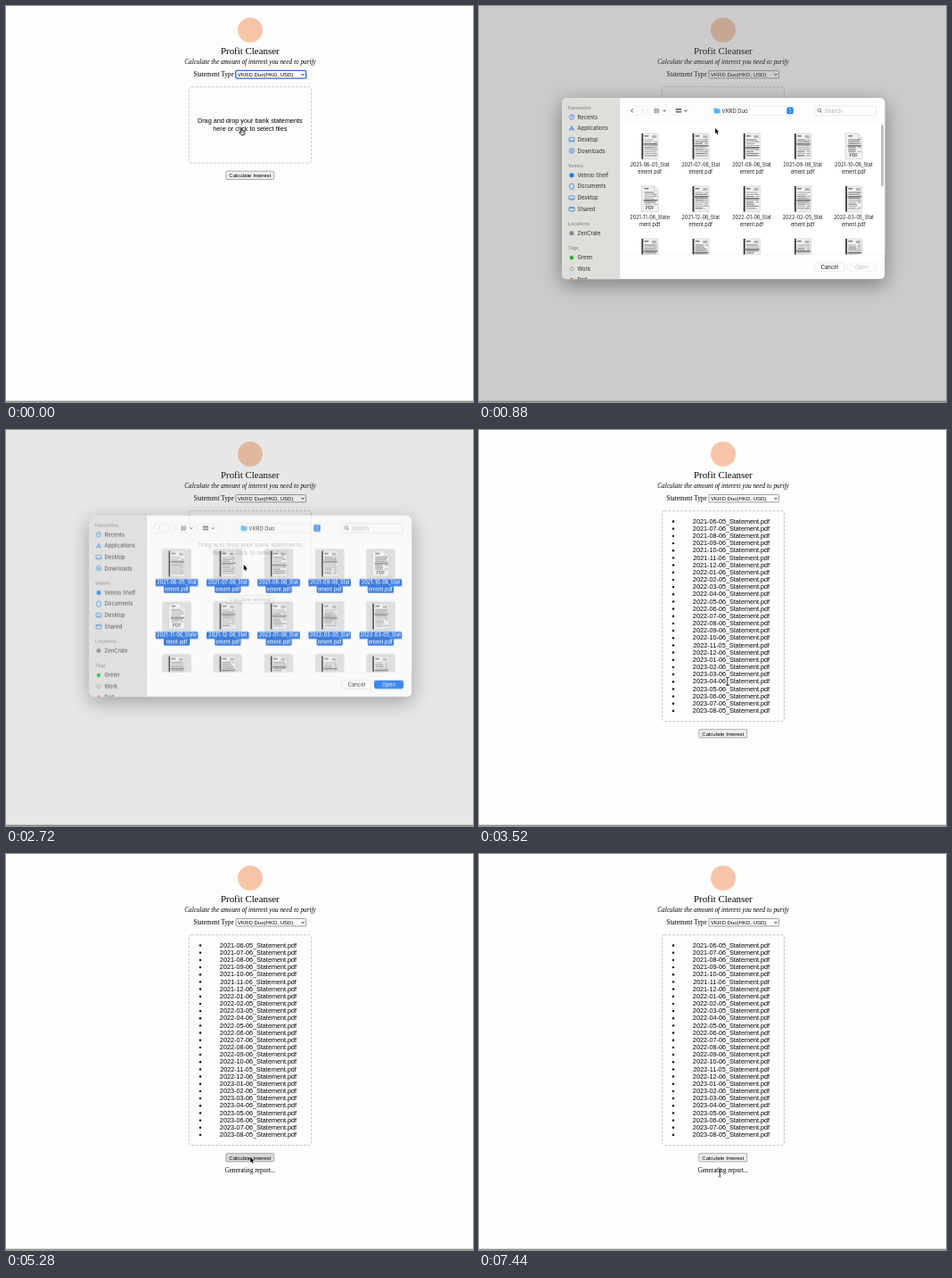
An HTML page with a canvas for the animation above (8 s loop, 524 by 444 pixels).

```html
<!DOCTYPE html>
<html lang="en">
<head>
<meta charset="utf-8">
<title>Profit Cleanser</title>
<style>
html, body { margin: 0; width: 100%; height: 100%; overflow: hidden; background: #fdfdfd; }
canvas { display: block; width: 524px; height: 444px; }
</style>
</head>
<body>
<canvas id="stage"></canvas>
<script>
const W = 524, H = 444, LOOP = 8000, STEP = 80;
const SERIF = '"Liberation Serif", serif';
const SANS = '"Liberation Sans", sans-serif';
const UI = 'Inter, "Open Sans", sans-serif';
const BLUE = '#1f7ae0', PICK = '#0b5cdb';
const PANEL = [93, 103.3, 362.4, 203, 5];
const dpr = window.devicePixelRatio || 1;

function setup(canvas) {
  canvas.width = W * dpr;
  canvas.height = H * dpr;
  const c = canvas.getContext('2d');
  c.scale(dpr, dpr);
  return c;
}
const main = setup(document.getElementById('stage'));
const sheet = document.createElement('canvas');
const sheetCtx = setup(sheet);
let g = main;

const clamp = v => Math.max(0, Math.min(1, v));
const ease = v => v * v * (3 - 2 * v);

function text(str, x, y, size, color, font, align = 'left', style = '') {
  g.font = `${style} ${size}px ${font}`;
  g.textAlign = align;
  g.fillStyle = color;
  g.fillText(str, x, y);
}
function rect(x, y, w, h, fill) {
  g.fillStyle = fill;
  g.fillRect(x, y, w, h);
}
function box(x, y, w, h, r, fill, stroke, lw = 0.5) {
  g.beginPath();
  g.roundRect(x, y, w, h, r);
  paint(fill, stroke, lw);
}
function circle(x, y, r, fill, stroke, lw) {
  g.beginPath();
  g.arc(x, y, r, 0, Math.PI * 2);
  paint(fill, stroke, lw);
}
function paint(fill, stroke, lw = 0.7) {
  if (fill) { g.fillStyle = fill; g.fill(); }
  if (stroke) { g.strokeStyle = stroke; g.lineWidth = lw; g.stroke(); }
}
function line(pts, color, lw = 0.7) {
  g.beginPath();
  for (let i = 0; i < pts.length; i += 2) g.lineTo(pts[i], pts[i + 1]);
  paint(null, color, lw);
}
function chevron(x, y, dx, dy, color, lw = 0.8) {
  line(dx ? [x - dx, y - 2, x + dx, y, x - dx, y + 2]
          : [x - 1.5, y - dy, x, y + dy, x + 1.5, y - dy], color, lw);
}

// Monthly statements, June 2021 to August 2023
const earlyMonths = [0, 8, 9, 17, 26];
const files = Array.from({ length: 27 }, (_, i) => {
  const m = i + 5;
  const month = String(m % 12 + 1).padStart(2, '0');
  return `${2021 + Math.floor(m / 12)}-${month}-0${earlyMonths.includes(i) ? 5 : 6}_Statement.pdf`;
});

function drawPage(s) {
  rect(0, 0, W, H, '#fdfdfd');
  circle(274, 27, 14, '#f6c5a8');
  text('Profit Cleanser', 273.8, 54.4, 10.9, '#000', SERIF, 'center');
  text('Calculate the amount of interest you need to purify', 274, 65.4, 7.26, '#000', SERIF, 'center', 'italic');
  text('Statement Type', 210.5, 79, 7.26, '#000', SERIF);

  if (s.focus) box(257.7, 72.4, 79, 8.7, 1.4, '#fff', '#2d6fd0', 1.4);
  else box(257.9, 72.6, 78.6, 8.3, 1, '#fff', '#6e6e6e', 0.7);
  text('VKRD Duo(HKD, USD)', 260, 78.9, 6.05, '#000', SANS);
  chevron(333, 76.8, 0, 0.8, '#000', 0.9);

  const bottom = s.listed ? 326.5 : 176;
  g.setLineDash([2.8, 1.7]);
  box(205.5, 90.7, 137, bottom - 90.7, 2.5, null, '#c2c2c2', 0.9);
  g.setLineDash([]);
  if (s.listed) {
    files.forEach((name, i) => {
      const y = 104.7 + i * 8.17;
      circle(218, y - 2.2, 1.2, '#000');
      text(name, 283, y, 7.26, '#000', SANS, 'center');
    });
  } else {
    text('Drag and drop your bank statements', 273.8, 131.4, 7.26, '#000', SANS, 'center');
    text('here or click to select files', 273.8, 139.6, 7.26, '#000', SANS, 'center');
  }

  const top = bottom + 9.2;
  box(246.8, top, 53.9, 9.3, 1.3, s.hover ? '#dadada' : '#efefef', '#767676', 0.6);
  text('Calculate Interest', 273.8, top + 6.8, 6.05, '#000', SANS, 'center');
  if (s.report) text('Generating report...', 273.8, 357.2, 7.26, '#000', SERIF, 'center');
  rect(0, 442.7, W, 1.3, '#8c8c8c');
}

const icons = {
  clock(y) { circle(104, y, 2.7, null, BLUE); line([104, y - 1.6, 104, y, 105.3, y], BLUE); },
  apps(y) {
    line([101.8, y + 2.6, 104, y - 2.6, 106.2, y + 2.6], BLUE, 0.8);
    line([101.3, y + 0.9, 106.7, y + 0.9], BLUE, 0.8);
  },
  desk(y) { box(101, y - 2.2, 6, 4.4, 0.8, null, BLUE, 0.7); line([101.6, y + 1.2, 106.4, y + 1.2], BLUE); },
  down(y) { circle(104, y, 2.7, null, BLUE); line([104, y - 1.5, 104, y + 1.4], BLUE); chevron(104, y + 0.7, 0, 0.7, BLUE, 0.6); },
  doc(y) { box(101.9, y - 2.8, 4.3, 5.6, 0.7, null, BLUE, 0.7); },
  share(y) { box(101, y - 2, 6, 4.4, 0.7, null, BLUE, 0.7); line([101, y - 1, 107, y - 1], BLUE); },
  dot(y) { circle(104, y, 2.5, BLUE); },
  greyDot(y) { circle(104, y, 2.5, '#85858a'); },
  green(y) { circle(104, y, 2.2, '#22b02c'); },
  ring(y) { circle(104, y, 2.1, null, '#8b8b8b', 0.7); },
  red(y) { circle(104, y, 2.2, '#ee4b3e'); }
};
const sidebar = [
  ['Favourites', 114], ['Recents', 124.5, 'clock'], ['Applications', 137.2, 'apps'],
  ['Desktop', 149.8, 'desk'], ['Downloads', 162.4, 'down'],
  ['Velmio', 179], ['Velmio Shelf', 189.7, 'dot'], ['Documents', 202.3, 'doc'],
  ['Desktop', 215, 'desk'], ['Shared', 227.6, 'share'],
  ['Locations', 244.2], ['ZenCrate', 254.8, 'greyDot'],
  ['Tags', 271.6], ['Green', 282.2, 'green'], ['Work', 294.8, 'ring'], ['Red', 307.3, 'red']
];

function drawSidebar() {
  rect(93, 103, 65, 204, '#dededb');
  for (const [label, y, icon] of sidebar) {
    if (icon) {
      icons[icon](y);
      text(label, 110.6, y + 2.1, 5.9, '#2c2c2c', UI);
    } else {
      text(label, 100, y + 1.8, 5.1, '#8f8f8c', UI, 'left', '600');
    }
  }
  rect(157.6, 103, 0.5, 204, '#cfcfcc');
}

function drawToolbar(s) {
  rect(158, 103, 298, 29, '#fdfdfd');
  const y = 117.4;
  box(166.5, y - 5, 22.3, 10, 2, '#fefefe', '#e2e2e2');
  line([177.6, y - 4.8, 177.6, y + 4.8], '#e2e2e2', 0.5);
  chevron(171.8, y, -1, 0, s.picked ? '#bcbcbc' : '#333', 0.9);
  chevron(183.2, y, 1, 0, '#c0c0c0');
  for (const x of [191.3, 215.5]) {
    box(x, y - 5, 22, 10, 2, '#fefefe', '#eaeaea');
    chevron(x + 16.7, y, 0, 0.8, '#333', 0.9);
  }
  for (let i = 0; i < 4; i++)
    box(196.8 + i % 2 * 3, y - 2.3 + (i >> 1) * 2.7, 1.9, 1.9, 0.3, null, '#555', 0.6);
  for (let i = 0; i < 6; i++)
    box(221 + i % 3 * 2.1, y - 2.3 + Math.floor(i / 3) * 2.9, 1.6, 1.6, 0.2, '#444');

  box(259.5, y - 5, 94, 10, 2, '#fefefe', '#e4e4e4');
  box(263.6, y - 3, 3.2, 2, 0.6, '#3ba4e8');
  box(263.6, y - 2.2, 7, 5.2, 0.8, '#58b7f0');
  text('VKRD Duo', 272.6, y + 2.1, 5.9, '#222', UI);
  box(345.3, y - 3.8, 7.4, 7.6, 1.8, '#2180f2');
  chevron(349, y - 1.4, 0, -0.7, '#fff', 0.8);
  chevron(349, y + 1.4, 0, 0.7, '#fff', 0.8);

  box(376.5, y - 5.2, 69, 10.4, 2, '#fefefe', '#d6d6d6');
  circle(381.9, y - 0.5, 1.9, null, '#555', 0.7);
  line([383.3, y + 0.9, 384.8, y + 2.4], '#555', 0.8);
  text('Search', 388, y + 2.1, 5.9, '#aaa', UI);
  rect(158, 131.6, 298, 0.5, '#ededed');
}

function drawThumb(x, y, i) {
  const isPdf = i === 4 || i === 5;
  let seed = i * 37 + 11;
  const rnd = () => (seed = (seed * 1103 + 12345) % 65536) / 65536;
  const l = x - 9.3, t = y - 14.3;
  g.beginPath();
  if (isPdf) {
    [[l, t], [x + 5, t], [x + 9.6, t + 4.8], [x + 9.6, y + 14.3], [l, y + 14.3]].forEach(p => g.lineTo(...p));
    g.closePath();
  } else g.rect(l, t, 18.6, 28.6);
  paint('#f2f2f2', '#c0c0c0', 0.6);
  if (isPdf) line([x + 5, t, x + 5, t + 4.8, x + 9.6, t + 4.8], '#bbb', 0.6);
  else rect(l + 0.2, t, 1.7, 28.6, '#333');

  rect(l + 3.2, t + 2, 4.8, 1.5, '#777');
  if (!isPdf) rect(x + 2.5, t + 2, 5, 3, '#b4b4b4');
  const rows = isPdf ? 7 : 9;
  for (let k = 0; k < rows; k++) {
    const ly = t + 6.5 + k * 2.2;
    rect(l + 3.2, ly, 8 + rnd() * 6, 1, rnd() > 0.5 ? '#777' : '#a6a6a6');
    if (rnd() > 0.3) rect(x + 4.5, ly, 3.6, 1, '#999');
  }
  rect(l + 2.4, t + 11 + i % 3 * 2, 15.4, 1.5, '#6c6c6c');
  if (isPdf) text('PDF', x, y + 11.6, 5, '#555', UI, 'center', '600');
  else rect(l + 3.2, y + 11.2, 13, 0.7, '#bdbdbd');
}

function drawFiles(picked) {
  g.save();
  g.beginPath();
  g.rect(158, 132.2, 298, 146.6);
  g.clip();
  rect(158, 132, 298, 147, '#fff');
  for (let i = 0; i < 15; i++) {
    const x = 191.6 + i % 5 * 57.2, y = 157.3 + Math.floor(i / 5) * 59;
    if (picked) box(x - 16.3, y - 16.8, 32.6, 33.6, 2.5, '#dcdcdc');
    drawThumb(x, y, i);
    const cut = i === 5 ? 16 : 15, name = files[i];
    if (picked) {
      box(x - 23.8, y + 17.2, 47.6, 8, 1.3, PICK);
      box(x - 14.6, y + 24.6, 29.2, 8, 1.3, PICK);
    }
    const ink = picked ? '#fff' : '#1c1c1c', style = picked ? '500' : '';
    text(name.slice(0, cut), x, y + 23.1, 5.5, ink, UI, 'center', style);
    text(name.slice(cut), x, y + 30.3, 5.5, ink, UI, 'center', style);
  }
  g.restore();
}

function drawSheet(s) {
  g.clearRect(0, 0, W, H);
  g.save();
  g.beginPath();
  g.roundRect(...PANEL);
  g.clip();
  rect(93, 103, 363, 204, '#fefefe');
  drawSidebar();
  drawToolbar(s);
  drawFiles(s.picked);
  rect(158, 278.6, 298, 0.5, '#e8e8e8');
  box(377, 288, 33, 9.4, 2.2, '#fff', '#d2d2d2');
  text('Cancel', 393.4, 294.8, 5.9, '#111', UI, 'center');
  box(413, 288, 33, 9.4, 2.2, s.picked ? '#0a6cf2' : '#fcfcfc', s.picked ? null : '#e8e8e8');
  text('Open', 429.4, 294.8, 5.9, s.picked ? '#fff' : '#bdbdbd', UI, 'center');
  if (s.scroll > 0) {
    g.globalAlpha = s.scroll;
    box(451.2, 133.2, 2.9, 69, 1.4, '#bdbdbd');
  }
  g.restore();
}

// The shadow stays outside the panel so a fading panel is not darkened by it
function drawShadow() {
  g.save();
  g.beginPath();
  g.rect(0, -30, W, H + 60);
  g.roundRect(...PANEL);
  g.clip('evenodd');
  g.shadowColor = 'rgba(0,0,0,0.4)';
  g.shadowBlur = 22 * dpr;
  g.shadowOffsetY = 6 * dpr;
  box(...PANEL, '#000');
  g.restore();
}

function drawDialog(s) {
  g = sheetCtx;
  drawSheet(s);
  g = main;
  const away = (1 - s.open) ** 2;
  g.globalAlpha = 0.35 * s.open;
  rect(0, 0, W, H, '#6e6e6e');
  g.save();
  g.translate(0, -22.5 * away);
  g.globalAlpha = 1 - 0.7 * away;
  drawShadow();
  g.drawImage(sheet, 0, 0, W, H);
  g.restore();
  g.globalAlpha = 1;
}

// Pointer path: time, x, y
const path = [
  [0, 264.4, 136.3], [80, 265.1, 137], [1520, 265.1, 137], [1920, 266.8, 149.8],
  [3040, 266.8, 151.5], [3280, 278.6, 276], [3440, 278.6, 276], [3520, 278.8, 282],
  [4080, 275, 339.5], [4480, 275, 339.5], [4800, 398, 378], [5040, 286, 384],
  [5120, 286, 384], [5280, 274.2, 339.8], [5360, 274.2, 339.8], [5680, 279, 357],
  [6160, 279, 357], [6480, 270.2, 357.5], [LOOP, 270.2, 357.5]
];
function pointer(t) {
  const i = Math.max(1, path.findIndex(p => p[0] >= t));
  const [t0, x0, y0] = path[i - 1], [t1, x1, y1] = path[i];
  const k = ease(clamp((t - t0) / (t1 - t0)));
  return [x0 + (x1 - x0) * k, y0 + (y1 - y0) * k];
}
const inside = (x, y, l, t, r, b) => x > l && x < r && y > t && y < b;

function shape(points, fill, stroke, lw) {
  g.beginPath();
  for (let i = 0; i < points.length; i += 2) g.lineTo(points[i], points[i + 1]);
  g.closePath();
  paint(fill, stroke, lw);
}
const ARROW = [0, 0, 0, 6.7, 1.5, 5.4, 2.6, 8, 3.7, 7.5, 2.6, 5, 4.7, 4.9];
const HAND = [-0.9, 0, 0.5, 0, 0.7, 3, 3.8, 3.6, 4.6, 4.6, 4, 7.2, 3.2, 8.8, -0.4, 8.8,
              -3.4, 5.2, -2.8, 4.3, -0.9, 5.6];

function drawPointer(x, y, kind) {
  g.save();
  g.translate(x, y);
  g.lineJoin = 'round';
  if (kind === 'text') {
    line([0, -4.2, 0, 4.2], '#222', 0.9);
    line([-1.7, -4.8, 0, -4.2, 1.7, -4.8], '#222', 0.6);
    line([-1.7, 4.8, 0, 4.2, 1.7, 4.8], '#222', 0.6);
  } else if (kind === 'hand') {
    g.translate(0, 1);
    g.scale(0.84, 0.84);
    shape(HAND, '#fff', '#000', 1);
    line([1.2, 5, 1.2, 7], '#222', 0.6);
    line([2.5, 5, 2.5, 7], '#222', 0.6);
  } else {
    g.scale(0.86, 0.86);
    shape(ARROW, '#000', '#fff', 0.9);
    shape(ARROW, '#000');
  }
  g.restore();
}

function pointerKind(t, x, y, s) {
  if (t < 800) return 'hand';
  if (s.open > 0) return 'arrow';
  if (inside(x, y, 205, 90, 343, 327)) return 'text';
  return inside(x, y, 245, 350, 303, 361) ? 'text' : 'arrow';
}

function render(now) {
  const t = Math.floor(now % LOOP / STEP) * STEP;
  const [x, y] = pointer(t);
  const s = {
    focus: t < 400,
    open: t < 2000 ? clamp((t - 640) / 240) : clamp((2960 - t) / 560),
    picked: t >= 1680,
    scroll: t < 800 ? 0 : clamp((1520 - t) / 240),
    listed: t >= 2960,
    report: t >= 4240
  };
  s.hover = s.listed && inside(x, y, 246, 335, 301, 346);
  g = main;
  drawPage(s);
  if (s.open > 0) drawDialog(s);
  drawPointer(x, y, pointerKind(t, x, y, s));
}

const start = performance.now();
function tick() {
  render(performance.now() - start);
  requestAnimationFrame(tick);
}
tick();
</script>
</body>
</html>
```
